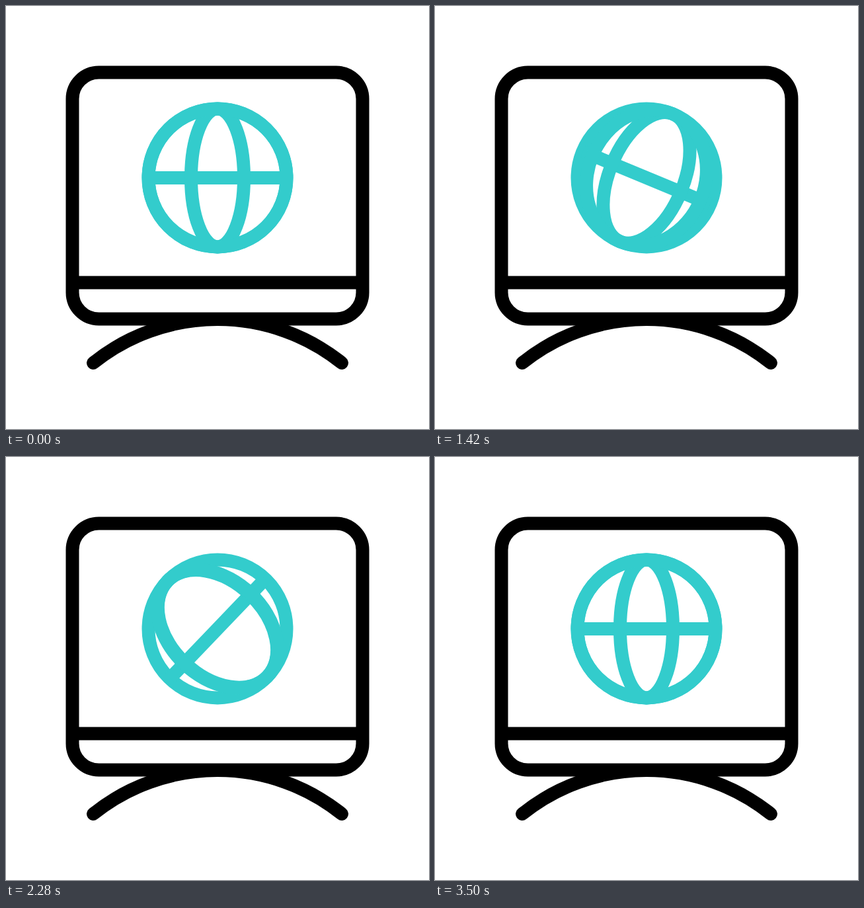
Animation of 640x640 px, one loop 3600 ms. Source, as an HTML page:

```html
<!DOCTYPE html>
<html lang="en">
<head>
<meta charset="utf-8">
<title>Globe on a monitor</title>
<style>
  html, body { margin: 0; height: 100%; overflow: hidden; background: #fff; }
  svg { display: block; width: 100%; height: 100%; }
</style>
</head>
<body>
<svg viewBox="0 0 640 640" fill="none" stroke-width="20">
  <g stroke="#000" stroke-linecap="round">
    <rect x="100.5" y="100.5" width="439" height="373" rx="40"/>
    <path d="M101 418.5H539M132 540A301 301 0 0 1 508 540"/>
  </g>
  <g stroke="#33cccc" transform="translate(320 259.9)">
    <circle r="104.5"/>
    <g id="globe">
      <path d="M-104 0H104"/>
      <ellipse id="inner" ry="104.5"/>
      <ellipse id="outer" ry="104.5"/>
    </g>
  </g>
</svg>
<script>
const LOOP = 3600, NARROW = 40, WIDE = 104.5;
const [globe, inner, outer] = ['globe', 'inner', 'outer'].map(id => document.getElementById(id));

// time in ms, angle in degrees, speed in degrees per ms
const keys = [
  [200, 0, 0],
  [1120, 9.5, 0.027],
  [1720, 47.9, 0.11],
  [2080, 101.7, 0.172],
  [2520, 160.5, 0.075],
  [2920, 175.2, 0.017],
  [3500, 180, 0]
];

// Smooth cubic curve through the keys
function angleAt(t) {
  if (t <= keys[0][0]) return 0;
  const i = keys.findIndex(k => k[0] > t);
  if (i < 0) return 180;
  const [t0, a0, v0] = keys[i - 1], [t1, a1, v1] = keys[i];
  const d = t1 - t0, u = (t - t0) / d, w = 1 - u;
  return a0 * w * w * (1 + 2 * u) + a1 * u * u * (3 - 2 * u)
    + d * u * w * (v0 * w - v1 * u);
}

function draw(t) {
  const angle = angleAt(t);
  // The two meridians swap widths on every quarter turn
  const grow = (angle / 90 % 1) * (WIDE - NARROW);
  globe.setAttribute('transform', `rotate(${angle})`);
  inner.setAttribute('rx', NARROW + grow);
  outer.setAttribute('rx', WIDE - grow);
}

const start = performance.now();
function tick() {
  draw((performance.now() - start) % LOOP);
  requestAnimationFrame(tick);
}
tick();
</script>
</body>
</html>
```
